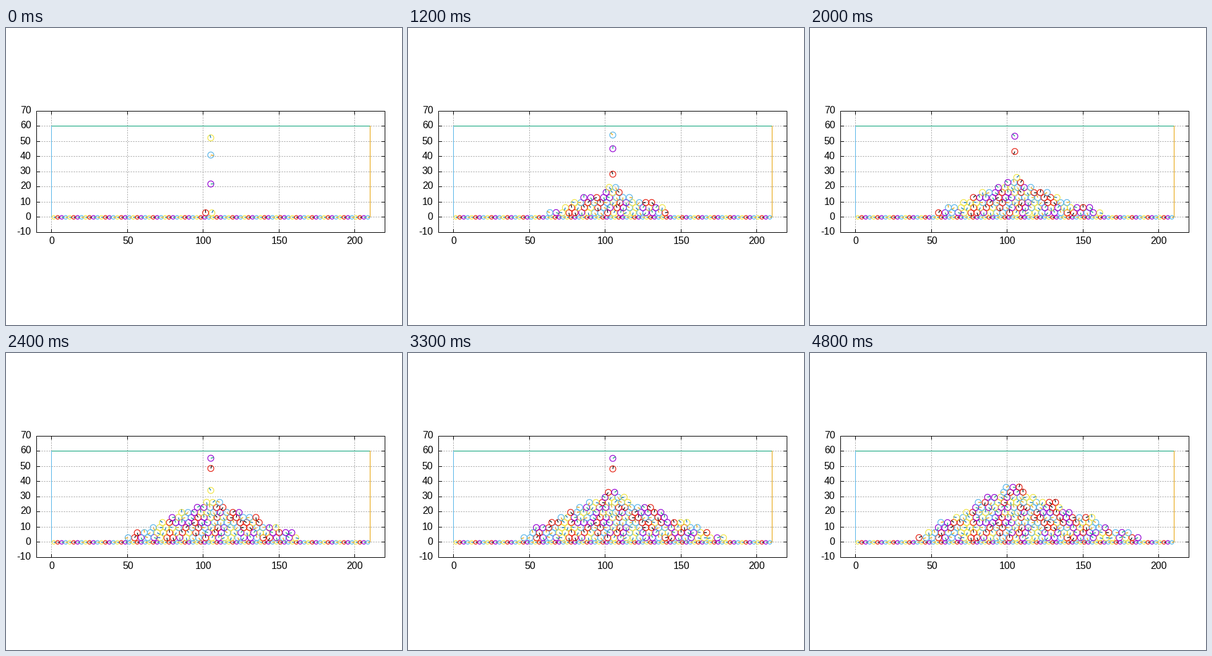
A matplotlib script for the animation above (4900 ms loop, 640 px wide and 480 px high).

```python
import numpy as np
import matplotlib.pyplot as plt
from matplotlib.animation import FuncAnimation
from matplotlib.collections import LineCollection

DPI = 100
PX = 72 / DPI                      # one pixel in points
FRAMES, INTERVAL = 49, 100
BALLS, DROP_X, DROP_Y = 200, 105, 56
FALL = 3.88                        # height lost per squared drop interval
T0, DT = 4.96, 4.892               # clock counted in drop intervals
GREY, GREEN, BLUE, ORANGE = "#a0a0a0", "#009e73", "#56b4e9", "#e69f00"
RIMS = ["#f0e442", "#e51e10", "#9400d3", BLUE]
HANDS = ["#0072b2", "#000000", GREEN, ORANGE]

rng = np.random.default_rng(7)


def X(x):
    return 49.5 + (x + 10) * 563 / 230


def Y(y):
    return 330.5 - (y + 10) * 196 / 80


def crisp(v):
    """Centre of the pixel that holds v."""
    return np.floor(v - 0.01) + 0.5


# Resting places: a slightly loose hexagonal packing above the bumpy floor
slots = np.array([(33.5 + 2.125 * (j % 2) - 0.2 * j + 4.25 * i, 3.05 + 3.33 * j)
                  for j in range(13) for i in range(-1, 42)])
slots = slots[slots[:, 0] < 208.2]
slots += rng.uniform(-1, 1, slots.shape) * (0.22, 0.1)
spin = rng.uniform(0, 2 * np.pi, len(slots))
start = rng.uniform(0, 2 * np.pi, BALLS)


def heap_top(t):
    return 37 * min(t / BALLS, 1) ** 0.65


def outline(x, t):
    """A rippled heap that steepens as it grows and runs out to the right."""
    p = min(t / BALLS, 1)
    dx = x - (DROP_X - 3 * p)
    reach = np.where(dx < 0, 66 * p ** 0.35, 88 * p ** 0.6)
    return heap_top(t) * (1 - np.abs(dx) / reach) + 1.2 * np.sin(x / 4)


def height(age):
    return DROP_Y - FALL * age ** 2


def settle(seats, landed, t):
    """Seat the landed balls in the deepest places under the outline."""
    score = outline(slots[:, 0], t) - slots[:, 1]
    score[list(seats.values())] += 0.8
    want = set(np.argsort(-score, kind="stable")[:len(landed)].tolist())
    new = {k: s for k, s in seats.items() if s in want}
    free = sorted(want - set(new.values()))
    displaced = [k for k in landed if k in seats and k not in new]
    for k in displaced + [k for k in landed if k not in seats]:
        if k in seats:
            old = slots[seats[k]]
            s = min(free, key=lambda i: np.hypot(*(slots[i] - old)))
        else:
            s = min(free, key=lambda i: slots[i, 1])
        free.remove(s)
        new[k] = s
    return new


def simulate():
    seats, scenes = {}, []
    for frame in range(FRAMES):
        t = T0 + DT * frame
        live = [k for k in range(BALLS) if k <= t]
        landed = [k for k in live if height(t - k) <= heap_top(t) + 2]
        seats = settle(seats, landed, t)
        scene = []
        for k in live:
            if k in seats:
                s = seats[k]
                scene.append((k, *slots[s], start[k] + spin[s]))
            else:
                scene.append((k, DROP_X, height(t - k), start[k]))
        scenes.append(scene)
    return scenes


turn = np.linspace(0, 2 * np.pi, 41)
ring = np.column_stack([np.cos(turn), np.sin(turn)])


def ball(x, y, r, angle):
    """Rim and radius hand of one ball, in pixels."""
    c, r = np.array([X(x), Y(y)]), r * 2.449
    tip = c + r * np.array([np.cos(angle), -np.sin(angle)])
    return [c + r * ring, np.array([c, tip])]


def paint(k):
    return [RIMS[k % 4], HANDS[k % 4]]


fig = plt.figure(figsize=(640 / DPI, 480 / DPI), dpi=DPI, facecolor="white")
ax = fig.add_axes([0, 0, 1, 1])
ax.set_xlim(0, 640)
ax.set_ylim(480, 0)
ax.axis("off")


def line(xs, ys, color="black", z=3, **kw):
    ax.plot(xs, ys, color=color, lw=PX, zorder=z, snap=False,
            solid_capstyle="projecting", dash_capstyle="butt", **kw)


L, R, T, B = 49.5, 612.5, 134.5, 330.5
dots = dict(color=GREY, z=1, ls=(0, (2, 2)))
font = dict(family="Liberation Sans", size=16 * PX, va="baseline")

for v in range(0, 201, 50):
    x = crisp(X(v))
    line([x, x], [B, T], **dots)
    line([x, x], [B, B - 5])
    line([x, x], [T, T + 5])
    ax.text(x + 0.3, 349, str(v), ha="center", **font)
for v in range(-10, 71, 10):
    y = crisp(Y(v))
    if -10 < v < 70:
        line([L, R], [y, y], **dots)
        line([L, L + 5], [y, y])
        line([R, R - 5], [y, y])
    ax.text(40.5, y + 4, str(v), ha="right", **font)
line([L, R, R, L, L], [T, T, B, B, T])

left, right, top, floor = crisp(X(0)), crisp(X(210)), crisp(Y(60)), crisp(Y(0))
line([left, right], [top, top], GREEN, 2)
line([left, left], [floor, top], BLUE, 2)
line([right, right], [floor, top], ORANGE, 2)

bumps = [part for i in range(80) for part in ball(2.625 * (i + 0.5), 0, 1.2, 0)]
ax.add_collection(LineCollection(bumps, colors=[c for i in range(80) for c in paint(i)],
                                 linewidths=1.2 * PX, zorder=4, snap=False))
heap = LineCollection([], linewidths=1.2 * PX, zorder=5, snap=False)
ax.add_collection(heap)
scenes = simulate()


def draw(frame):
    scene = scenes[frame]
    heap.set_segments([part for _, x, y, a in scene for part in ball(x, y, 2, a)])
    heap.set_color([c for k, *_ in scene for c in paint(k)])
    return [heap]


anim = FuncAnimation(fig, draw, frames=FRAMES, interval=INTERVAL, repeat=True)
plt.show()
```
